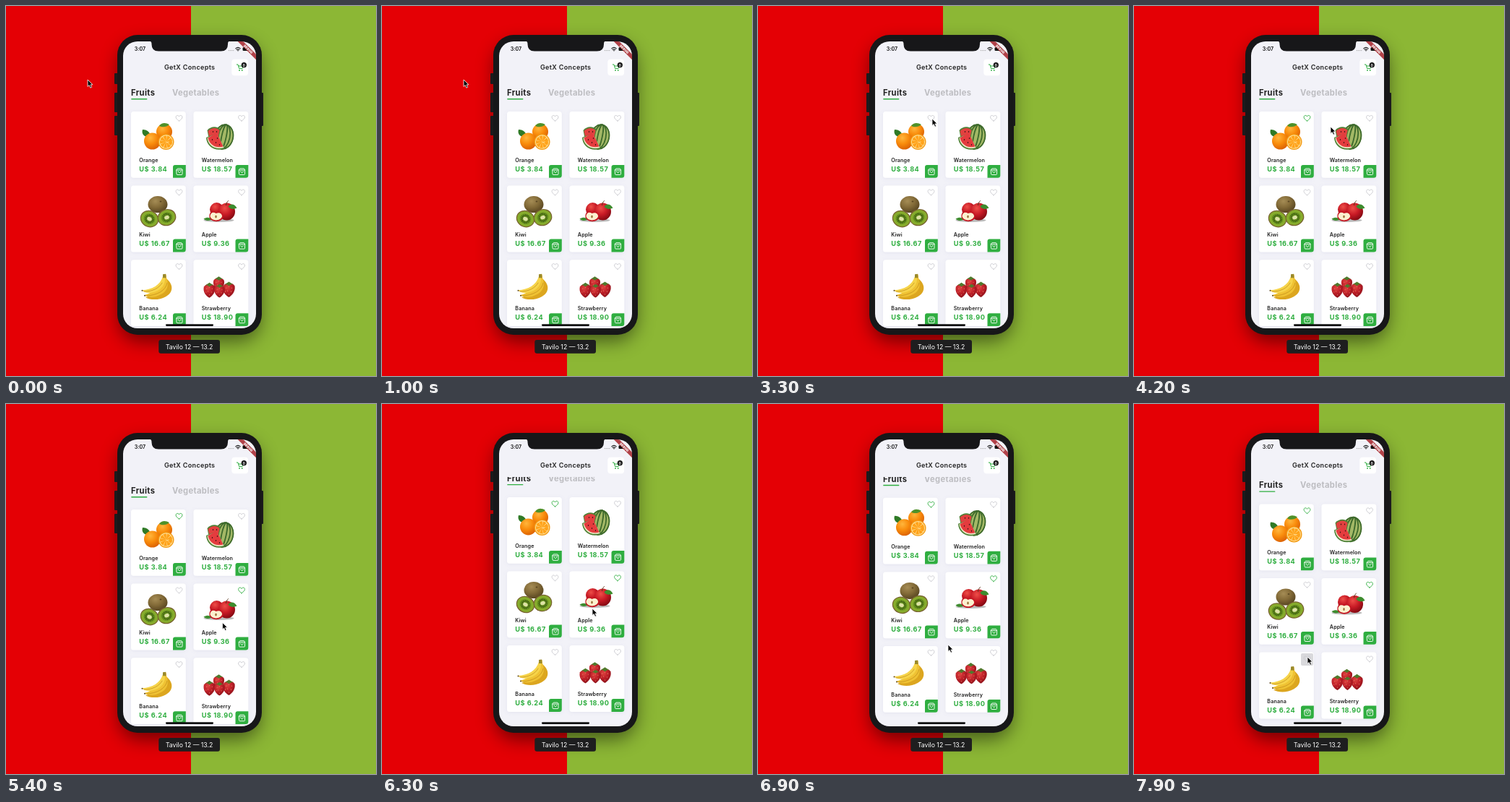
Write an HTML page that moves like this. It is 512 px wide and 512 px high and loops after 8000 ms.

```html
<!DOCTYPE html>
<html lang="en">
<head>
<meta charset="utf-8">
<title>GetX Concepts</title>
<style>
  html, body { margin: 0; height: 100%; overflow: hidden; }
  svg { display: block; width: 100%; height: 100%; font-family: Inter, "Open Sans", sans-serif; }
  .line { fill: none; stroke-linecap: round; stroke-linejoin: round; }
  .name { font-size: 7.2px; font-weight: 600; fill: #222; letter-spacing: .12px; }
  .price { font-size: 9.2px; font-weight: 700; fill: #2fae40; letter-spacing: .48px; }
  .tab { font-size: 11.2px; font-weight: 700; letter-spacing: .36px; }
</style>
</head>
<body>
<svg id="stage" viewBox="0 0 512 512"></svg>
<script>
const GREEN = '#2fae40', PAGE = '#f2f2f8';
const LOOP = 8000, STEP = 100;

const rect = (x, y, w, h, r, fill, extra = '') =>
  `<rect x="${x}" y="${y}" width="${w}" height="${h}" rx="${r}" fill="${fill}" ${extra}/>`;
const oval = (x, y, rx, ry, fill, extra = '') =>
  `<ellipse cx="${x}" cy="${y}" rx="${rx}" ry="${ry}" fill="${fill}" ${extra}/>`;
const path = (d, fill, extra = '') => `<path d="${d}" fill="${fill}" ${extra}/>`;
const line = (d, color, width, extra = '') =>
  `<path class="line" d="${d}" stroke="${color}" stroke-width="${width}" ${extra}/>`;
const text = (x, y, str, attrs) => `<text x="${x}" y="${y}" ${attrs}>${str}</text>`;
const glow = (id, ...colors) => `<radialGradient id="${id}" cx=".38" cy=".3" r=".75">` +
  colors.map((c, i) => `<stop offset="${i / (colors.length - 1)}" stop-color="${c}"/>`).join('') +
  '</radialGradient>';

// Dashed rings make the citrus segments and the kiwi seeds.
const ring = (x, y, r, width, color, count, fill) =>
  `<circle cx="${x}" cy="${y}" r="${r}" fill="none" stroke="${color}" stroke-width="${width}"
    pathLength="${count}" stroke-dasharray="${fill} ${1 - fill}"/>`;

const kiwiHalf = (x, y, tilt) => `<g transform="translate(${x} ${y}) rotate(${tilt})">` +
  oval(0, 0, 13, 11.5, '#77602f') + oval(0, 0, 11.8, 10.3, '#86ab2c') +
  oval(0, 0, 8, 7, '#64911d') + ring(0, 0, 5, 2.2, '#26300f', 15, .35) +
  oval(0, 0, 3.4, 2.6, '#dde2a5') + '</g>';

const berry = (x, y, size) => `<g transform="translate(${x} ${y}) scale(${size})">` +
  path('M-8-5C-4-11 5-10 8-5C10 2 4 9 0 11C-5 9-10 2-8-5Z', 'url(#berry)') +
  [[-4, -2], [0, -4], [4, -2], [-2, 2], [3, 3], [0, 7], [-5, 3]]
    .map(([a, b]) => oval(a, b, .5, .8, '#e58468')).join('') +
  path('M-6-7L-3-9L0-11L3-9L6-7L3-7L0-5L-3-7Z', '#4f7a2c') + '</g>';

const fruits = [
  ['Orange', 'U$ 3.84',
    path('M27 36C18 36 14 31 16 25C23 25 27 29 27 36Z', '#2f7a26') +
    oval(46, 28, 11, 11, 'url(#orange)') +
    path('M39 20C42 15 48 15 53 18C49 22 43 22 39 20Z', '#4f9129') +
    oval(29.5, 41, 11.5, 11.5, 'url(#orange)') +
    oval(48.5, 42, 11, 11, '#f39a12') + oval(48.5, 42, 9.6, 9.8, '#ffe09a') +
    ring(48.5, 42, 4.6, 8, '#ffa31a', 9, .86)],
  ['Watermelon', 'U$ 18.57',
    '<g transform="translate(42 35) rotate(12)">' + oval(0, 0, 13.5, 17.5, '#a3b866') +
    [12.7, 8.2, 3.2].map(rx => oval(0, 0, rx, 17, 'none', 'stroke="#3d6a2c" stroke-width="1.8"')).join('') + '</g>' +
    path('M19 26C24 20 33 20 37 25L34 42L22 42Z', '#4d8236') +
    path('M20 27C25 22 32 22 36 26L33 41L23 40Z', '#e2403f') +
    path('M17.5 36C18 48 29 56 43 51.5L32 30Z', '#4d8236') +
    path('M19 36.5C20 47 30 53.5 42 50L32 30Z', '#efe5c5') +
    path('M20 36.5C22 46 31 51.5 41 48.5L32 29Z', '#e43c3e') +
    [[27, 28], [32, 28], [26, 39], [31, 43], [33, 37], [36, 46]]
      .map(([a, b]) => oval(a, b, .7, 1, '#3a1415')).join('')],
  ['Kiwi', 'U$ 16.67',
    oval(37, 26, 13.5, 11.5, 'url(#kiwi)') +
    oval(41, 22, 1.4, 1, '#5b4722') + kiwiHalf(25.5, 46, 25) + kiwiHalf(49.5, 44, -20)],
  ['Apple', 'U$ 9.36',
    oval(35, 48, 21, 2.5, '#0004') + oval(32, 33, 9.5, 9.5, 'url(#apple)') +
    oval(46, 36, 11.5, 12, 'url(#apple)') +
    line('M45 27C45 24 47 22 48 21', '#5a3519', 1) +
    path('M48 29C51 24 57 25 60 31C55 33 51 33 48 29Z', '#3d8c2e') +
    path('M14 46C19 43 23 44 26 47C21 49 17 49 14 46Z', '#3d8c2e') +
    path('M22 44C21 36 27 34 31 37C36 34 42 38 41 44C39 51 25 52 22 44Z', '#c51622') +
    path('M23 43C23 37 28 36 31 38.5C36 36 40 39 39.5 43C37 49 26 50 23 43Z', '#fbf1cf') +
    oval(31, 43, 1.2, 2, '#9a6b35')],
  ['Banana', 'U$ 6.24',
    path('M45 21L48.5 20L49 26C59 34 59 45 48 51C39 56 27 56 20 52C34 48 43 39 45 21Z', '#dca61f') +
    path('M45 23L48 23C54 34 50 44 41 48C32 53 24 52 18 49C32 45 42 37 45 23Z', '#efc233') +
    path('M44 23L47 24C48 34 42 41 34 44C26 47 19 46 15 42C30 41 40 35 44 23Z', '#f6d44a') +
    line('M21 50C36 49 48 43 50 32M18 44C30 44 39 39 43 32', '#c08a1a', .7) +
    path('M44 25L44 20L48 19.5L48.5 25Z', '#9a8a2b') +
    oval(15.5, 42.5, 1, 1, '#5e4517') + oval(19, 49.5, 1, 1, '#5e4517')],
  ['Strawberry', 'U$ 18.90',
    berry(35, 33, .9) + berry(49, 41, .98) + berry(22, 42, .95) + berry(36, 43, .85)]
];

const HEART = 'M0 3.8C-3 1.6-4.4.2-4.4-1.5C-4.4-4.2-1.2-4.8 0-2.3C1.2-4.8 4.4-4.2 4.4-1.5C4.4.2 3 1.6 0 3.8Z';

const card = ([name, price, art], i) =>
  `<g transform="translate(${i % 2 ? 259.5 : 173} ${146 + 102.6 * (i >> 1)})">` +
  rect(0, 0, 75.8, 91.8, 3.5, '#fff', 'filter="url(#soft)"') +
  rect(58, 1.5, 17, 17, 2, '#d9d9dc', 'class="press" visibility="hidden"') +
  `<path class="line heart" d="${HEART}" transform="translate(66.5 9.3)" stroke-width=".9"/>` + art +
  text(11.3, 70, name, 'class="name"') + text(11.3, 83, price, 'class="price"') +
  path('M58 77Q58 74 61 74H75.8V88.3Q75.8 91.8 72.3 91.8H58Z', GREEN) +
  line('M63 80.5L64.3 79H69.8L71 80.5V86.5Q71 87.5 70 87.5H64Q63 87.5 63 86.5ZM63 81H71M65.2 82.7C65.5 85.4 68.6 85.4 68.8 82.7', '#fff', .9) +
  '</g>';

const stage = document.getElementById('stage');
stage.innerHTML = '<defs>' +
  glow('orange', '#ffb63c', '#f98c0c', '#d95f03') +
  glow('kiwi', '#a58c55', '#836b38', '#54421f') +
  glow('apple', '#ee4e48', '#c81a25', '#7d0710') +
  glow('berry', '#dd4340', '#be1f28', '#861018') +
  `<filter id="soft" x="-20%" y="-20%" width="140%" height="140%">
     <feDropShadow dx="0" dy="1" stdDeviation="2.5" flood-color="#8080b0" flood-opacity=".13"/></filter>
   <filter id="blur" x="-40%" y="-40%" width="180%" height="180%"><feGaussianBlur stdDeviation="13"/></filter>
   <clipPath id="screen">${rect(162, 49, 184, 397, 20, '#000')}</clipPath>
   <clipPath id="list">${rect(162, 101, 184, 345, 0, '#000')}</clipPath></defs>` +
  rect(0, 0, 256, 512, 0, '#e40005') + rect(256, 0, 256, 512, 0, '#8cb735') +
  rect(156, 52, 196, 412, 30, '#000', 'opacity=".5" filter="url(#blur)"') +
  [[150, 93, 15], [150, 120, 27], [150, 152, 27], [350.5, 120, 46]]
    .map(([x, y, h]) => rect(x, y, 5.5, h, 1, '#1b1b1d')).join('') +
  rect(154, 40, 200, 415, 28, '#171719') +
  '<g clip-path="url(#screen)">' + rect(162, 49, 184, 397, 0, PAGE) +
  '<g clip-path="url(#list)"><g id="scroll">' +
  text(173, 124, 'Fruits', 'class="tab" fill="#222"') +
  text(230, 124, 'Vegetables', 'class="tab" fill="#bdbdc1"') +
  rect(173.3, 128, 22, 1.4, .3, GREEN) + fruits.map(card).join('') + '</g></g>' +
  text(219, 88.3, 'GetX Concepts', 'font-size="9.1" font-weight="600" letter-spacing=".3" fill="#222"') +
  rect(312.3, 73.8, 22.8, 22.4, 4, '#fff') +
  line('M319.3 81H321L322.6 86.6H327L328.3 83H321.7', GREEN, 1) +
  oval(323, 89, .9, .9, GREEN) + oval(326.7, 89, .9, .9, GREEN) +
  oval(329.3, 81.7, 3.6, 3.6, '#111') +
  text(329.3, 83.5, '0', 'font-size="5" font-weight="700" fill="#fff" text-anchor="middle"') +
  text(177.7, 62.2, '3:07', 'font-size="7.1" font-weight="600" fill="#111"') +
  [308.5, 310.6, 312.7, 314.8].map(x => oval(x, 61.6, .6, .6, '#999')).join('') +
  line('M317.8 58.8Q321 56 324.2 58.8M319.2 60.5Q321 58.9 322.8 60.5', '#111', 1.1) +
  oval(321, 61.8, .8, .8, '#111') +
  rect(327.5, 57.2, 9, 4.8, 1.3, '#111') + rect(337, 58.6, .8, 2, .4, '#555') +
  '<g transform="translate(346 49) rotate(45)">' + rect(-30, 12.6, 60, 5.3, 0, '#a31a20d0') +
  text(0, 16.9, 'DEBUG', 'font-size="4.5" font-weight="900" fill="#fff" text-anchor="middle"') + '</g>' +
  path('M198 48Q201.5 49 201.5 52V53Q201.5 62.5 211 62.5H297.5Q307 62.5 307 53V52Q307 49 310 48Z', '#171719') +
  rect(221, 440.3, 66, 2.6, 1.3, '#111') + '</g>' +
  rect(211.3, 462, 84.7, 18.8, 3, '#1e1e1f') +
  text(253.6, 474.6, 'Tavilo 12 — 13.2', 'font-size="8.7" fill="#fff" text-anchor="middle"') +
  path('M0 0V9.5L2.2 7.5L3.8 11.2L5.6 10.4L4 6.9H7Z', '#000', 'id="pointer" stroke="#fff" stroke-width=".8"');

// Keys are [time, ...values].
const pointerKeys = [[0, 113, 102], [1400, 113, 102], [1900, 108, 103], [2200, 96, 104], [2700, 215, 146],
  [3000, 241, 156], [3700, 241, 156], [4200, 272, 167], [4700, 325, 256], [5100, 325, 256],
  [5500, 294, 311], [6000, 291, 283], [6400, 291, 283], [6900, 263, 333], [7300, 256, 349], [7600, 240, 350]];
const scrollKeys = [[0, 0], [5500, 0], [6000, -17.1], [6300, -17.1], [6600, -16.2], [6900, -16.2], [7300, -7.6]];
const likes = { 0: 3600, 3: 5000 };
const presses = { 0: [3400, 3600], 3: [4800, 5000], 4: [7700, LOOP] };

// Monotone cubic: flows through the keys, rests where a value repeats or turns.
function at(keys, t) {
  const j = keys.findIndex(k => k[0] > t);
  if (j < 0) return keys[keys.length - 1].slice(1);
  const a = keys[j - 1], b = keys[j], span = b[0] - a[0], p = (t - a[0]) / span;
  return a.slice(1).map((v, n) => {
    const c = n + 1;
    const slope = i => keys[i - 1] && keys[i] ? (keys[i][c] - keys[i - 1][c]) / (keys[i][0] - keys[i - 1][0]) : 0;
    const tangent = i => {
      const l = slope(i), r = slope(i + 1);
      return l * r > 0 ? 2 * l * r / (l + r) : 0;
    };
    const ease = p * p * (3 - 2 * p), q = 1 - p;
    return v + (b[c] - v) * ease + span * p * q * (q * tangent(j - 1) - p * tangent(j));
  });
}

const pointer = document.getElementById('pointer'), list = document.getElementById('scroll');
const hearts = stage.querySelectorAll('.heart'), pads = stage.querySelectorAll('.press');
const start = performance.now();

function draw() {
  const elapsed = Math.max(0, performance.now() - start);
  const t = Math.floor(elapsed / STEP) * STEP % LOOP;
  pointer.setAttribute('transform', `translate(${at(pointerKeys, t)})`);
  list.setAttribute('transform', `translate(0 ${at(scrollKeys, t)[0]})`);
  hearts.forEach((heart, i) => heart.setAttribute('stroke', t >= likes[i] ? GREEN : '#c9c9ce'));
  pads.forEach((pad, i) => {
    const [from, to] = presses[i] || [];
    pad.setAttribute('visibility', t >= from && t < to ? 'visible' : 'hidden');
  });
  requestAnimationFrame(draw);
}
draw();
</script>
</body>
</html>
```
